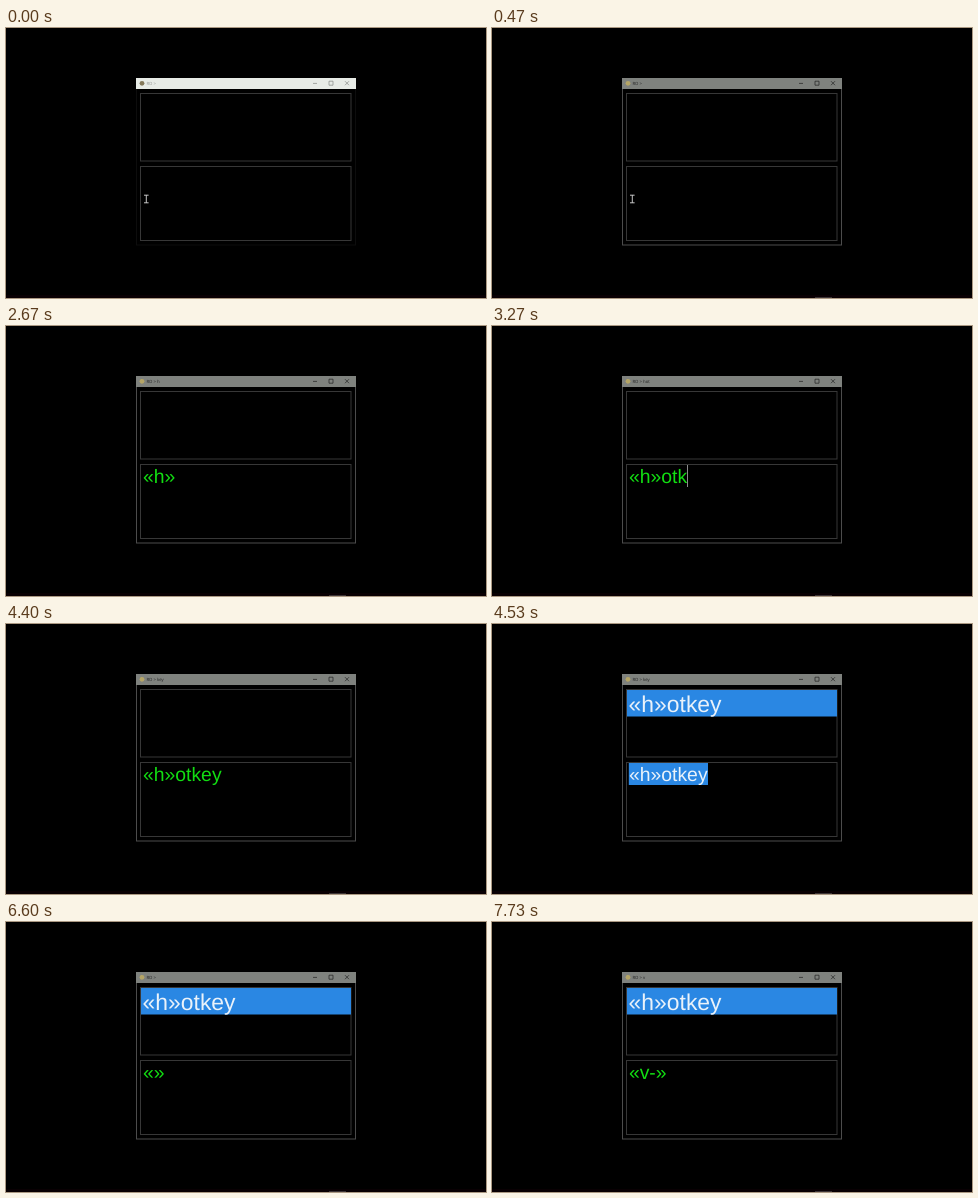
An HTML page that plays this animation: 480 px wide and 270 px high, repeating every 8000 ms.

```html
<!DOCTYPE html>
<html lang="en">
<head>
<meta charset="utf-8">
<title>Hotkey entry</title>
<style>
  html, body { margin: 0; width: 100%; height: 100%; overflow: hidden; background: #000; }
  svg { display: block; width: 480px; height: 270px; }
  text { white-space: pre; text-rendering: geometricPrecision; font-family: "Liberation Sans", Arial, sans-serif; }
  #bar { fill: #7f827e; }
  #frame { fill: none; stroke: #4c4c4c; }
  #icon { fill: #b5a566; }
  #title { font: 4.3px "Open Sans", sans-serif; fill: #222; }
  #controls { fill: none; stroke: #222; stroke-width: .7; }
  .box { fill: none; stroke: #373737; }
  .mark { fill: #2a87e3; }
  #result text { font-size: 22.9px; fill: #eaf2fa; }
  #entry { font-size: 19.4px; fill: #12de12; }
  .selected #entry { fill: #eaf2fa; }
  #caret { fill: #8c8c8c; }
  #pointer { fill: none; stroke: #c4c4c4; }
  .idle #bar { fill: #e7ebe6; }
  .idle #frame { stroke: #0d0d0d; }
  .idle #icon { fill: #84795a; }
  .idle #title { fill: #8e908e; }
  .idle #controls { stroke: #858785; }
  .idle #edge { visibility: hidden; }
</style>
</head>
<body>
<svg id="stage" class="idle" viewBox="0 0 480 270">
  <rect width="480" height="270"/>
  <rect y="267" width="480" height="3" fill="#090003"/>
  <rect id="edge" x="323" y="269" width="17" height="1" fill="#3c3436"/>

  <rect id="frame" x="130.5" y="50.5" width="219" height="166.5"/>
  <rect id="bar" x="130" y="50" width="220" height="11"/>
  <circle id="icon" cx="136" cy="55.3" r="2.4"/>
  <text id="title" x="140.4" y="56.9"></text>
  <path id="controls" d="M307 55.4h4M323 53.2h4v4h-4zM339 53.2l4 4m0-4l-4 4"/>

  <rect class="box" x="134.5" y="65.5" width="210.5" height="67.5"/>
  <rect class="box" x="134.5" y="138.5" width="210.5" height="74"/>

  <g id="result">
    <rect class="mark" x="135" y="66" width="210" height="26.5"/>
    <text x="136.6" y="87.8">«h»otkey</text>
  </g>
  <rect id="selection" class="mark" x="136.8" y="139" width="79.2" height="22"/>
  <text id="entry" x="136.9" y="157"></text>
  <rect id="caret" y="139" width="1" height="22"/>
  <path id="pointer" d="M138 167.2h4.6M140.3 167v8M138 174.8h4.6"/>
</svg>
<script>
  const LOOP = 8000, BLINK = 530, LEFT = 136.9;
  const $ = id => document.getElementById(id);

  // [time, text, caret index]; the caret blinks anew after each edit
  const edits = [
    [0, "", -1],
    [930, "«»", 1],
    [1530, "«h»", 2],
    [2130, "«h»", 3],
    [2730, "«h»o", 4],
    [2870, "«h»ot", 5],
    [3270, "«h»otk", 6],
    [3670, "«h»otke", 7],
    [3870, "«h»otkey", 8],
    [4470, "«h»otkey", -1],
    [4870, "", 0],
    [6070, "«»", 1],
    [6670, "«v»", 2],
    [7200, "«v-»", 3]
  ];

  const titles = [
    [0, ""], [1600, "h"], [2800, "ho"], [2930, "hot"], [3330, "k"],
    [3730, "ke"], [4070, "key"], [4870, ""], [6800, "v"]
  ];

  const at = (list, t) => list.findLast(item => item[0] <= t);
  const show = (id, on) => $(id).setAttribute("visibility", on ? "visible" : "hidden");
  const within = (t, a, b) => t >= a && t < b;

  function setText(id, value) {
    if ($(id).textContent !== value) $(id).textContent = value;
  }

  function draw(t) {
    const [start, text, index] = at(edits, t);
    const selected = within(t, 4530, 4870);
    $("stage").setAttribute("class", t < 400 ? "idle" : selected ? "selected" : "");
    setText("title", "RO > " + at(titles, t)[1]);
    setText("entry", text);

    const offset = index > 0 ? $("entry").getSubStringLength(0, index) : 0;
    $("caret").setAttribute("x", Math.round(LEFT + offset - .5));
    show("caret", index >= 0 && Math.floor((t - start) / BLINK) % 2 === 0);
    show("pointer", t < 930);
    show("result", t >= 4470);
    show("selection", selected);
  }

  const origin = performance.now();
  function tick() {
    draw((performance.now() - origin) % LOOP);
    requestAnimationFrame(tick);
  }
  tick();
</script>
</body>
</html>
```
